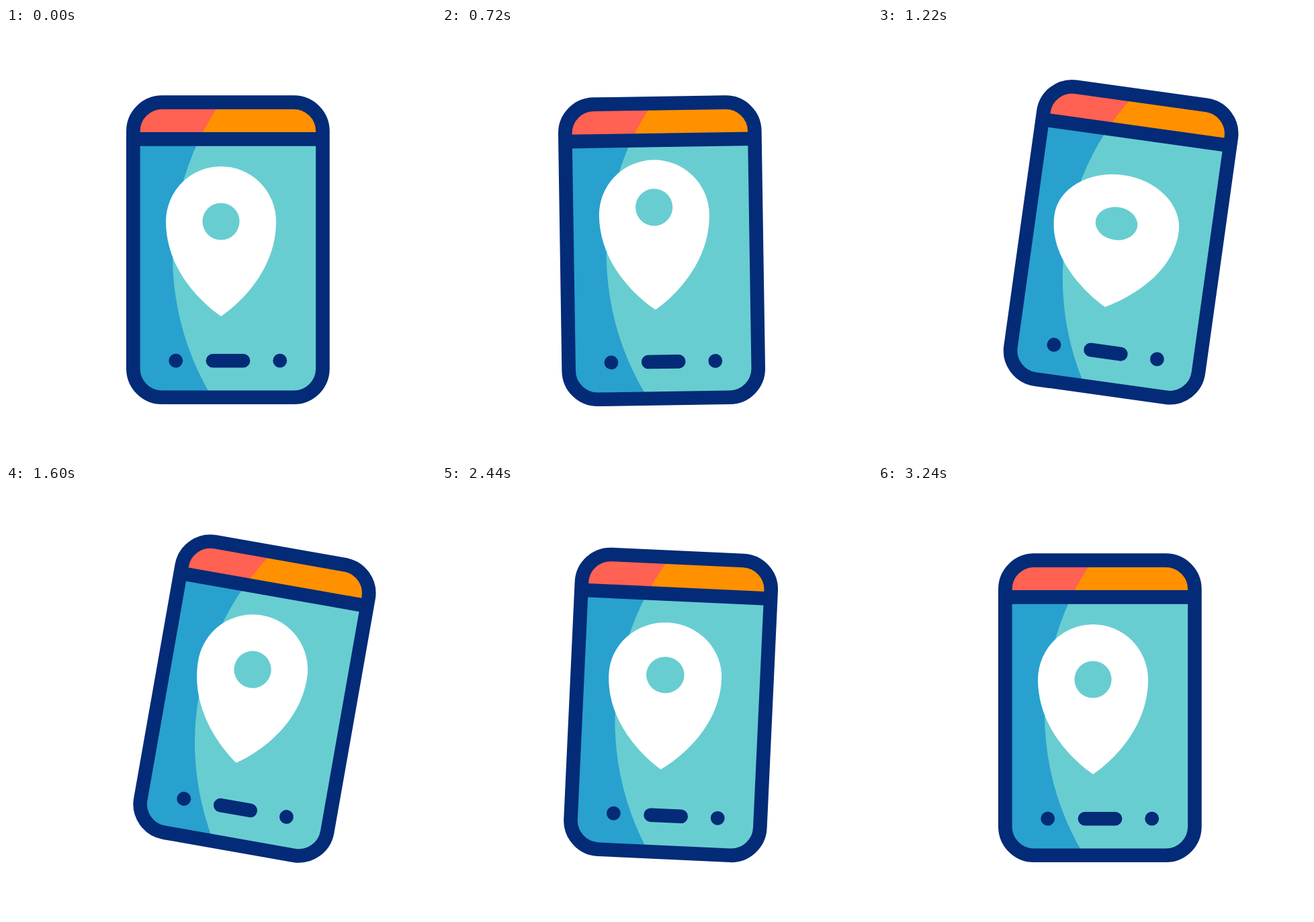
Animation, 640 px wide and 640 px high, one loop 3.6 s. Source, as an HTML page:

```html
<!DOCTYPE html>
<html lang="en">
<head>
<meta charset="utf-8">
<title>Phone with map pin</title>
<style>
  html, body { margin: 0; width: 100%; height: 100%; overflow: hidden; background: #fff; }
  svg { display: block; width: 100%; height: 100%; }
  .navy { fill: #032b77; }
  .line { fill: none; stroke: #032b77; stroke-width: 20.6; }
  .teal { fill: #68cdd1; }
</style>
</head>
<body>
<svg viewBox="0 0 640 640">
  <defs>
    <clipPath id="case"><rect x="189.3" y="110.6" width="282.1" height="439.2" rx="43"/></clipPath>
    <clipPath id="header"><rect x="180" y="100" width="300" height="65"/></clipPath>
  </defs>
  <g id="phone">
    <g clip-path="url(#case)">
      <rect x="180" y="100" width="300" height="460" fill="#28a1ce"/>
      <circle class="teal" cx="651" cy="340" r="403"/>
      <g clip-path="url(#header)">
        <rect x="180" y="100" width="300" height="65" fill="#ff6152"/>
        <circle cx="651" cy="340" r="403" fill="#ff9100"/>
      </g>
    </g>
    <path class="line" d="M190 165.4H471"/>
    <rect class="line" x="189.3" y="110.6" width="282.1" height="439.2" rx="43"/>
    <circle class="navy" cx="252.7" cy="495.2" r="10.4"/>
    <circle class="navy" cx="407.7" cy="495.2" r="10.4"/>
    <path class="line" stroke-linecap="round" d="M307.9 495.2H353.1"/>
    <g id="pin">
      <path fill="#fff" d="M320 429C320 429 238 377 238 288A82 82 0 0 1 402 288C402 377 320 429 320 429Z"/>
      <circle id="hole" class="teal" cx="320" cy="288" r="27.6"/>
    </g>
  </g>
</svg>
<script>
  const LOOP = 3600, STEP = 20;
  const JUMPS = [240, 1840];
  const [phone, pin, hole] = ['phone', 'pin', 'hole'].map(id => document.getElementById(id));

  // Cubic bezier easing with control points (a, 0) and (b, 1).
  const bezier = (a, b) => x => {
    let low = 0, high = 1;
    for (let i = 0; i < 24; i++) {
      const s = (low + high) / 2, r = 1 - s;
      if (3 * r * r * s * a + 3 * r * s * s * b + s * s * s < x) low = s;
      else high = s;
    }
    return low * low * (3 - 2 * low);
  };
  const smooth = bezier(0.5, 0.5);
  const settle = bezier(0.5, 0.2);
  const swingBack = bezier(0.61, 0);

  // Each key is [time, value, easing towards this key].
  function track(keys, t) {
    if (t <= keys[0][0]) return keys[0][1];
    for (let i = 1; i < keys.length; i++) {
      const [t0, v0] = keys[i - 1], [t1, v1, ease = smooth] = keys[i];
      if (t < t1) return v0 + (v1 - v0) * ease((t - t0) / (t1 - t0));
    }
    return keys[keys.length - 1][1];
  }

  const TILT = [[240, 0], [460, -2], [1560, 10], [1840, 10], [3240, 0, swingBack]];
  const LIFT = [[0, 0], [220, -24.8], [720, 0]];
  const WIDTH = [[220, 1], [350, 0.928], [480, 1], [880, 1.15], [1400, 1, settle]];
  const HEIGHT = [[480, 1], [880, 0.88], [1400, 1, settle]];

  function draw(t) {
    const jump = t - (t < JUMPS[1] ? JUMPS[0] : JUMPS[1]);
    const lift = track(LIFT, jump);
    const sx = track(WIDTH, jump), sy = track(HEIGHT, jump);
    phone.setAttribute('transform', `rotate(${track(TILT, t)} 428.4 549.5)`);
    pin.setAttribute('transform', `translate(320 ${429 + lift}) scale(${sx} ${sy}) translate(-320 -429)`);
    hole.setAttribute('cy', 288 + lift);
  }

  const start = performance.now();
  function tick() {
    const t = (performance.now() - start) % LOOP;
    draw(Math.floor(t / STEP) * STEP);
    requestAnimationFrame(tick);
  }
  tick();
</script>
</body>
</html>
```
